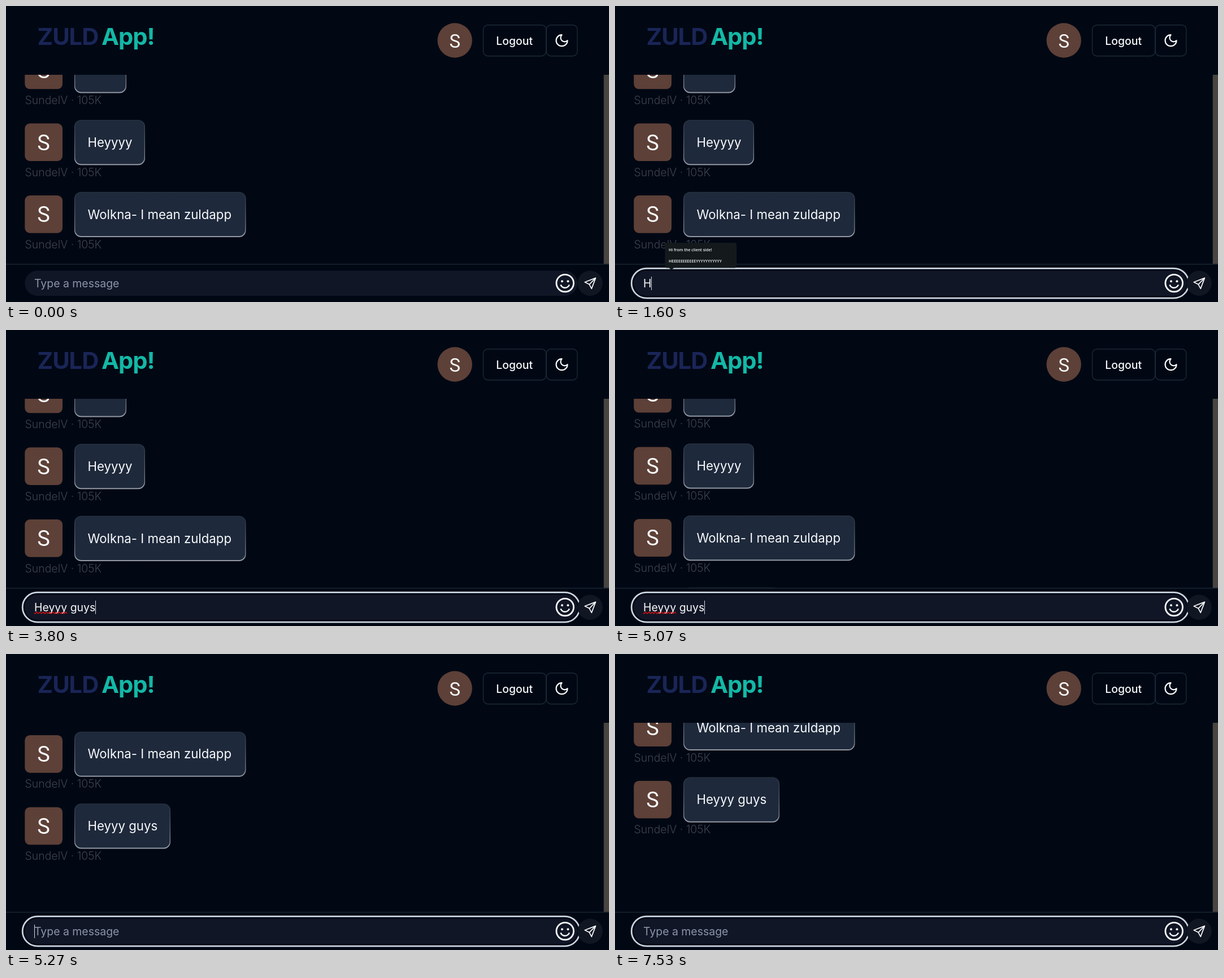
An HTML page with a canvas for the animation above (8000 ms loop, 1067 by 525 pixels).

```html
<!DOCTYPE html>
<html lang="en">
<head>
<meta charset="utf-8">
<title>Chat</title>
<style>
  html, body { margin: 0; width: 100%; height: 100%; overflow: hidden; background: #010814; }
  canvas { display: block; }
</style>
</head>
<body>
<canvas id="stage" width="1067" height="525"></canvas>
<script>
const ctx = document.getElementById('stage').getContext('2d');
const LOOP = 8000;
const BG = '#010814', WHITE = '#f8fafc', BORDER = '#1c2836', BROWN = '#5d4037';
const INTER = 'Inter, sans-serif';
const ROW = 127.7;

const messages = [
  { text: '', width: 92 },
  { text: 'Heyyyy', width: 125 },
  { text: 'Wolkna- I mean zuldapp', width: 303.5 },
  { text: 'Heyyy guys', width: 170, from: 5070, avatarFrom: 5270 },
];

// [start time, value] steps
const typed = [
  [0, ''], [1600, 'H'], [1930, 'He'], [2130, 'Hey'], [2270, 'Heyy'], [2400, 'Heyyy'],
  [3000, 'Heyyy '], [3330, 'Heyyy g'], [3470, 'Heyyy gu'], [3600, 'Heyyy guy'],
  [3800, 'Heyyy guys'], [5130, ''],
];
const caret = [
  [0, false], [200, true], [730, false], [1270, true], [2930, false], [3000, true],
  [4330, false], [4870, true], [5400, false], [5930, true], [6470, false],
  [7000, true], [7530, false],
];
const history = [
  'Wolkna- I mean zuldapp', 'what is this', 'yooo', 'test',
  'Hi from the client side!', 'HEEEEEEEEEEEYYYYYYYYYYY',
];
const suggestions = [[0, 0], [270, 6], [1600, 2], [2000, 1], [2200, 0]];
const scrollTicks = [[0, 0], ...[5070, 5130, 5200, 5270, 5330, 5400].map(t => [t, t])];

const at = (steps, t) => steps.reduce((value, [start, v]) => (t >= start ? v : value), steps[0][1]);

function scrollAt(t) {
  const p = Math.min(1, Math.max(0, (at(scrollTicks, t) - 5060.5) / 292.5));
  return 238.8 * p * p * (3 - 2 * p);
}

function box(x, y, w, h, r, fill) {
  ctx.beginPath();
  ctx.roundRect(x, y, w, h, r);
  if (fill) { ctx.fillStyle = fill; ctx.fill(); }
}

function circle(x, y, r, fill) {
  ctx.beginPath();
  ctx.arc(x, y, r, 0, Math.PI * 2);
  if (fill) { ctx.fillStyle = fill; ctx.fill(); }
}

function stroke(color, width) {
  ctx.strokeStyle = color;
  ctx.lineWidth = width;
  ctx.stroke();
}

function text(str, x, y, font, color, align = 'left') {
  ctx.font = font;
  ctx.fillStyle = color;
  ctx.textAlign = align;
  ctx.fillText(str, x, y);
}

function header() {
  const logo = `700 41.7px ${INTER}`;
  ctx.letterSpacing = '-1.04px';
  text('ZULD', 55.5, 68.5, logo, '#1a2557');
  text('App!', 169, 68.5, logo, '#13b8a6');
  ctx.letterSpacing = '0px';

  circle(794.2, 61, 30.7, BROWN);
  text('S', 794.2, 73.5, '33px Roboto, sans-serif', WHITE, 'center');

  box(844.6, 33.7, 111, 55, 8);
  stroke(BORDER, 1.4);
  text('Logout', 899.7, 68.5, `500 19.45px ${INTER}`, WHITE, 'center');
  box(956.3, 33.7, 54.6, 55, 8);
  stroke(BORDER, 1.4);

  ctx.save();
  ctx.translate(970.2, 47.9);
  ctx.scale(1.11, 1.11);
  ctx.lineJoin = 'round';
  ctx.strokeStyle = WHITE;
  ctx.lineWidth = 2;
  ctx.stroke(new Path2D('M12 3a6 6 0 0 0 9 9 9 9 0 1 1-9-9Z'));
  ctx.restore();
}

function message({ text: body, width, avatarFrom = 0 }, y, t) {
  if (t >= avatarFrom) {
    box(33.3, y + 6.3, 66.7, 66.7, 9, BROWN);
    text('S', 66.6, y + 53.5, '38px Roboto, sans-serif', WHITE, 'center');
  }
  const edge = ctx.createLinearGradient(0, y, 0, y + 80);
  edge.addColorStop(0, '#27313f');
  edge.addColorStop(0.5, '#566070');
  edge.addColorStop(1, '#949ba6');
  box(121, y, width, 80.2, 12, edge);
  box(122.3, y + 1.2, width - 2.6, 77, 11, '#1e293b');
  text(body, 144.5, y + 47.8, `22.23px ${INTER}`, WHITE);
  text('SundelV · 105K', 33.5, y + 99.8, `300 19.45px ${INTER}`, '#3d424d');
}

function chat(t) {
  ctx.save();
  ctx.beginPath();
  ctx.rect(0, 122, 1067, 335.5);
  ctx.clip();
  const top = 74.3 - scrollAt(t);
  messages.forEach((m, i) => {
    if (t >= (m.from || 0)) message(m, top + i * ROW, t);
  });
  ctx.fillStyle = '#474442';
  ctx.fillRect(1057.7, 122, 10, 336);
  ctx.restore();
}

function squiggle(x, end) {
  ctx.beginPath();
  for (let i = x; i <= end; i += 0.5) ctx.lineTo(i, 501.7 + 1.3 * Math.sin((i - x) * 1.1));
  stroke('#e01212', 1.4);
}

function smiley() {
  circle(989.2, 491.6, 15.3);
  stroke(WHITE, 2.8);
  circle(984, 488.2, 2, WHITE);
  circle(994.4, 488.2, 2, WHITE);
  ctx.beginPath();
  ctx.arc(989.2, 491.6, 8.2, 0.35, Math.PI - 0.35);
  stroke(WHITE, 2.4);
}

function sendButton() {
  circle(1033.6, 491.7, 22.2, '#111623');
  ctx.lineJoin = 'round';
  ctx.beginPath();
  ctx.moveTo(1043.4, 482.4);
  ctx.lineTo(1024.2, 489.8);
  ctx.lineTo(1032.2, 493.8);
  ctx.lineTo(1036.2, 501.4);
  ctx.closePath();
  ctx.lineTo(1032.2, 493.8);
  stroke(WHITE, 1.7);
}

function composer(t) {
  ctx.fillStyle = BORDER;
  ctx.fillRect(0, 457.3, 1067, 1.4);
  if (t >= 200) {
    box(29.2, 465.3, 986, 52.8, 26.4, BG);
    stroke('#cbd5e1', 2.8);
  }
  box(33.3, 469.5, 977.8, 44.4, 22.2, '#111626');

  const value = at(typed, t);
  const font = `19.45px ${INTER}`;
  text(value || 'Type a message', 50, 499, font, value ? WHITE : '#8a96aa');
  if (t >= 3070 && value) squiggle(50, 50 + ctx.measureText('Heyyy').width);
  if (at(caret, t)) {
    ctx.fillStyle = '#d5dbe4';
    ctx.fillRect(Math.floor(50 + ctx.measureText(value).width), 480, 1, 24);
  }
  smiley();
  sendButton();
}

function popup(t) {
  const rows = at(suggestions, t);
  if (!rows) return;
  const top = 460 - rows * 20, fill = '#141a1c';
  box(88.5, top, 126.5, 464.5 - top, 3, fill);
  ctx.beginPath();
  ctx.moveTo(95, 464);
  ctx.lineTo(105, 464);
  ctx.lineTo(100, 468);
  ctx.fill();
  history.slice(-rows).forEach((line, i) =>
    text(line, 95, top + 15 + i * 20, '600 7px "Open Sans", sans-serif', '#f1f3f3'));
}

function draw(now) {
  const t = now % LOOP;
  ctx.fillStyle = BG;
  ctx.fillRect(0, 0, 1067, 525);
  header();
  chat(t);
  composer(t);
  popup(t);
  requestAnimationFrame(draw);
}
draw(0);
</script>
</body>
</html>
```
